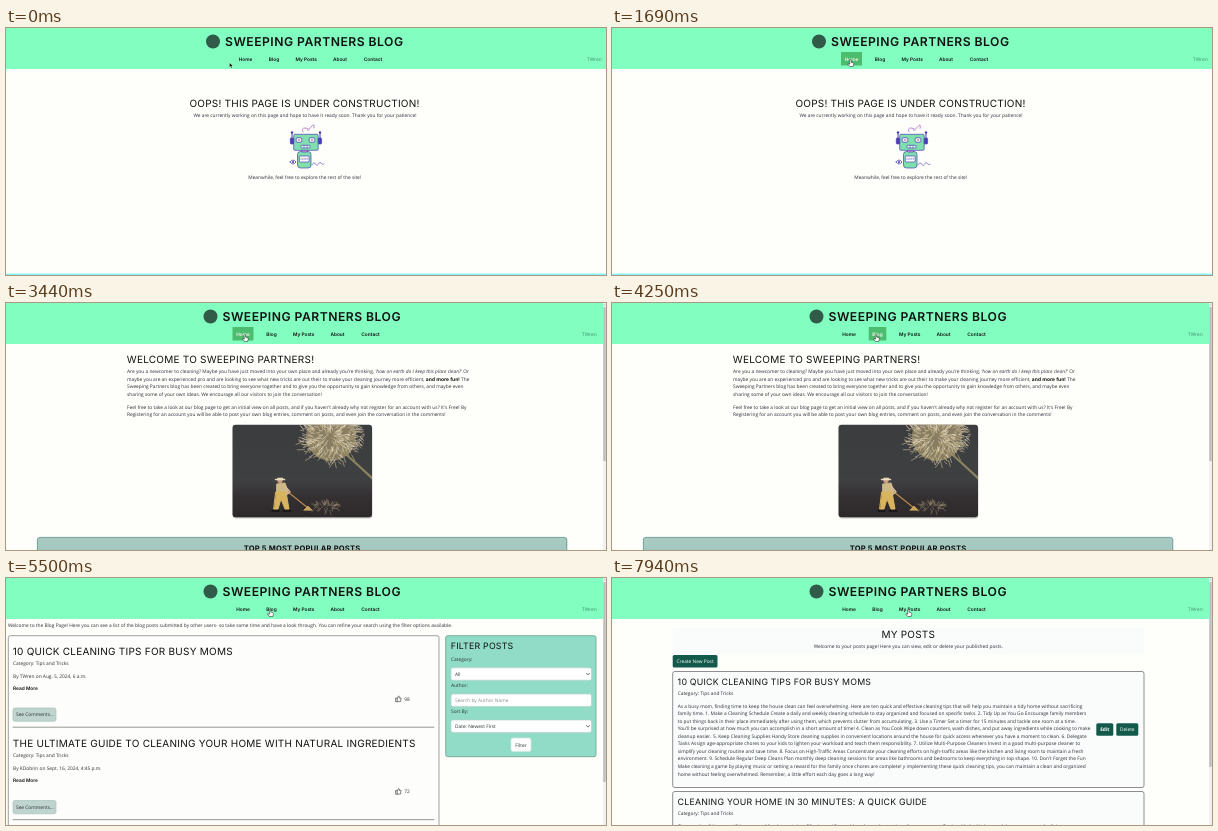
Write an HTML page that moves like this. It is 600 px wide and 247 px high and loops after 8000 ms.

```html
<!DOCTYPE html>
<html lang="en">
<head>
<meta charset="utf-8">
<title>Sweeping Partners Blog</title>
<style>
  html, body { margin: 0; width: 100%; height: 100%; overflow: hidden; background: #fefefb; }
  svg { display: block; width: 100vw; height: 100vh; }
  text { font: 4.84px "Open Sans", "Noto Sans", sans-serif; fill: #2b3034; text-rendering: geometricPrecision; }
  .h { font: 10px Inter, sans-serif; letter-spacing: .024em; fill: #111; }
  .h.small { font-size: 8.8px; }
  .h.panel { font-size: 7.6px; font-weight: 700; }
  .h.brand { font-size: 12.2px; font-weight: 600; letter-spacing: .47px; }
  .nav { font: 600 4.8px Inter, sans-serif; fill: #111; }
  .mid { text-anchor: middle; }
  .bold { font-weight: 700; fill: #111; }
  .hint { fill: #858a8c; }
  .user { fill: #3f8a66; }
  .tiny { font-size: 3px; fill: #4b3fb5; }
  .button { fill: #fff; }
</style>
</head>
<body>
<svg id="stage" viewBox="0 0 600 247" preserveAspectRatio="none"></svg>
<script>
const text = (x, y, s, cls = '') => `<text x="${x}" y="${y}" class="${cls}">${s}</text>`;
const box = (x, y, w, h, fill, stroke = 'none', r = 2, extra = '') =>
  `<rect x="${x}" y="${y}" width="${w}" height="${h}" rx="${r}" fill="${fill}" stroke="${stroke}" stroke-width=".7" ${extra}/>`;
const path = (d, stroke, width = .7, fill = 'none') =>
  `<path d="${d}" stroke="${stroke}" stroke-width="${width}" fill="${fill}" stroke-linecap="round" stroke-linejoin="round"/>`;
const disc = (x, y, r, fill, opacity = 1) => `<circle cx="${x}" cy="${y}" r="${r}" fill="${fill}" opacity="${opacity}"/>`;
const lines = (x, y, pitch, list) => list.map((s, i) => text(x, y + i * pitch, s)).join('');
const group = (id, content) => `<g id="${id}">${content}</g>`;

const links = [
  { name: 'Home', x: 239.5, half: 10.5 },
  { name: 'Blog', x: 268, half: 8.8 },
  { name: 'My Posts', x: 300.2, half: 14 },
  { name: 'About', x: 334, half: 10.6 },
  { name: 'Contact', x: 367, half: 12.7 }
];

const header = () => box(0, 0, 600, 41, '#82ffc0', 'none', 0) + group('bar',
  disc(207, 13.5, 7, '#2f5b48') +
  text(219, 17.5, 'SWEEPING PARTNERS BLOG', 'h brand') +
  box(0, 24, 20, 13.6, '#4cbc6e', 'none', .5, 'id="hover"') +
  links.map(l => text(l.x, 32.7, l.name, 'nav mid')).join('')) +
  group('user', text(581, 32.6, 'TWren', 'user'));

function robot() {
  const ink = '#4b3fb5', green = '#7fe0ae';
  const eye = (x, y) => box(x - 2.8, y - 2.3, 5.6, 4.6, '#e9fff4', ink, 1) +
    path(`M${x - 1.3} ${y - 1.2}l2.6 2.4m0 -2.4l-2.6 2.4`, '#d05aa8', .6);
  return box(291.5, 123.5, 13.5, 16.5, green, ink, 3) +
    box(293.3, 128, 9.8, 6, '#fff', ink, .8) + text(298.2, 132.1, 'OOPS', 'tiny mid') +
    path('M284 134q3 -4 6 0q-3 4 -6 0', ink, .8, '#fff') + disc(287, 134, 1, ink) +
    group('wire', path('M306 137q2 -4 3.5 -1t3 0t2.5 -1t3 1', ink, .6)) +
    group('head',
      box(295.5, 120, 6, 4, '#e69bcd', ink, .5) +
      box(287.7, 106.3, 24.5, 16, green, ink, 1.2) + eye(293, 112) + eye(306, 112) +
      box(295, 117.3, 9, 2.6, '#e9fff4', ink, .5) + path('M298 117.3v2.6M301 117.3v2.6', ink, .5) +
      box(284.3, 110, 3.4, 6, ink, ink, 1) + box(312.2, 110, 3.4, 6, ink, ink, 1) +
      path('M286 110v-5M314 110v-5', ink, 1) + disc(286, 104.5, 1.2, ink) + disc(314, 104.5, 1.2, ink)) +
    group('spring', path('M297 104q-2 -4 2 -4t3 2t3 -3t3 1', '#a65ac2', .7));
}

const construction = () =>
  text(298.5, 78.5, 'OOPS! THIS PAGE IS UNDER CONSTRUCTION!', 'h mid') +
  text(299, 88.8, 'We are currently working on this page and hope to have it ready soon. Thank you for your patience!', 'mid') +
  robot() +
  text(298.7, 151, 'Meanwhile, feel free to explore the rest of the site!', 'mid') +
  box(0, 245.6, 600, 1.4, '#7ff6fb', 'none', 0);

// Ragged tufts of a dandelion head: short strokes scattered around a centre.
function tufts(cx, cy, rx, ry, count, length) {
  let seed = 7, d = '';
  const random = () => (seed = seed * 16807 % 2147483647) / 2147483647;
  for (let i = 0; i < count; i++) {
    const a = random() * 2 * Math.PI, r = Math.sqrt(random()), turn = a + random() * 1.6 - .8;
    const size = length * (.5 + random());
    d += `M${(cx + rx * r * Math.cos(a)).toFixed(1)} ${(cy + ry * r * Math.sin(a)).toFixed(1)}` +
      `l${(size * Math.cos(turn)).toFixed(1)} ${(size * Math.sin(turn)).toFixed(1)}`;
  }
  return d;
}

const photo = () =>
  box(226.9, 122.6, 139.5, 93, '#c4c4c2', 'none', 3) +
  '<g clip-path="url(#frame)">' + box(226, 121, 141, 94, 'url(#dusk)', 'none', 0) +
  path('M336 148Q350 160 368 177', '#8b8460', 2.2) +
  disc(325, 133, 25, '#a3936c', .75) +
  path(tufts(325, 134, 31, 26, 260, 5), '#c9b98f', .6) +
  path(tufts(327, 132, 30, 25, 190, 4), '#eee6d2', .5) +
  path(tufts(319, 204, 13, 3.5, 45, 4), '#94856a', .5) +
  path('M277 185L302 205', '#b98a4c', 1.1) + path('M298 207l4 -4l4 4z', '#c9a45e', .8, '#c9a45e') +
  path('M271 181l8 -1l3 9l-3 3h-8z', '#cdb988', 1, '#cdb988') +
  path('M270 189h10l3 17h-4l-4 -10l-3 10h-4z', '#d9b45e', 1, '#d9b45e') +
  path('M279 183l5 6l-4 3', '#d8b79a', 1.5) + disc(274, 177.5, 2.6, '#c99f80') +
  path('M269.5 176.5h9M272 175.5h4.5', '#e6dcbd', 1.5) +
  path('M266 208h7m4 0h8', '#151214', 1.5) + '</g>';

const homeText = () =>
  text(120.8, 60, 'WELCOME TO SWEEPING PARTNERS!', 'h') +
  lines(121, 70.2, 7.5, [
    "Are you a newcomer to cleaning? Maybe you have just moved into your own place and already you're thinking, <tspan font-style='italic'>'how on earth do I keep this place clean?'</tspan> Or",
    'maybe you are an experienced pro and are looking to see what new tricks are out their to make your cleaning journey more efficient, <tspan class="bold">and more fun!</tspan> The',
    'Sweeping Partners blog has been created to bring everyone together and to give you the opportunity to gain knowledge from others, and maybe even',
    'sharing some of your own ideas. We encourage all our visitors to join the conversation!'
  ]) +
  lines(121, 105.6, 7.5, [
    "Feel free to take a look at our blog page to get an initial view on all posts, and if you haven't already why not register for an account with us? It's Free! By",
    'Registering for an account you will be able to post your own blog entries, comment on posts, and even join the conversation in the comments!'
  ]);

const homeMedia = () => photo() + box(31.4, 234.4, 529.4, 30, 'url(#panel)', '#48857a', 2.5) +
  text(296, 247.6, 'TOP 5 MOST POPULAR POSTS', 'h panel mid');

const entry = (y, title, by, likes) =>
  text(6.8, y + 19, title, 'h') +
  text(7, y + 29.2, 'Category: Tips and Tricks') + text(7, y + 42, by) +
  text(7, y + 54.2, 'Read More', 'nav') +
  path(`M390 ${y + 62.6}h1.2v3.6h-1.2zM391.2 ${y + 62.8}l1.4 -2.4q1.2 .2 .6 2h1.9l-.6 3.7h-3.3`, '#333', .6) +
  text(398.3, y + 65.2, likes) +
  box(7, y + 72.5, 43, 13.3, '#bfd4cf', '#a9c2bc') + text(10, y + 80.9, 'See Comments...') +
  path(`M7 ${y + 91.7}H428`, '#8c8c8c', .9);

const field = (y, label, value, cls, arrow) =>
  text(445, y - 7.3, label) + box(445, y, 140.5, 12.4, '#fff', '#bccfca', 1.8) +
  text(449, y + 8, value, cls) + (arrow ? path(`M580.5 ${y + 5.5}l1.5 1.6l1.5 -1.6`, '#333') : '');

const blog = () =>
  text(2, 49, 'Welcome to the Blog Page! Here you can see a list of the blog posts submitted by other users- so take some time and have a look through. You can refine your search using the filter options available.') +
  box(2.3, 57.7, 430.7, 200, '#fdfdfb', '#77797c') +
  entry(57.5, '10 QUICK CLEANING TIPS FOR BUSY MOMS', 'By TWren on Aug. 5, 2024, 6 a.m.', 98) +
  entry(150, 'THE ULTIMATE GUIDE TO CLEANING YOUR HOME WITH NATURAL INGREDIENTS', 'By KDobrin on Sept. 16, 2024, 4:45 p.m.', 72) +
  box(439.7, 57.7, 150.3, 121, '#90dcc6', '#5f9586') +
  text(444.8, 71, 'FILTER POSTS', 'h small') +
  field(89.8, 'Category:', 'All', '', true) +
  field(116, 'Author:', 'Search by Author Name', 'hint', false) +
  field(142, 'Sort By:', 'Date: Newest First', '', true) +
  box(505, 160, 20, 13.4, '#fff', '#d5e5e0') + text(515, 168.5, 'Filter', 'mid');

const opening = 'As a busy mom, finding time to keep the house clean can feel overwhelming. Here ar';
const article = [
  opening + 'e ten quick and effective cleaning tips that will help you maintain a tidy home without sacrificing',
  'family time. 1. Make a Cleaning Schedule Create a daily and weekly cleaning schedule to stay organized and focused on specific tasks. 2. Tidy Up as You Go Encourage family members',
  'to put things back in their place immediately after using them, which prevents clutter from accumulating. 3. Use a Timer Set a timer for 15 minutes and tackle one room at a time.',
  "You'll be surprised at how much you can accomplish in a short amount of time! 4. Clean as You Cook Wipe down counters, wash dishes, and put away ingredients while cooking to make",
  'cleanup easier. 5. Keep Cleaning Supplies Handy Store cleaning supplies in convenient locations around the house for quick access whenever you have a moment to clean. 6. Delegate',
  'Tasks Assign age-appropriate chores to your kids to lighten your workload and teach them responsibility. 7. Utilize Multi-Purpose Cleaners Invest in a good multi-purpose cleaner to',
  'simplify your cleaning routine and save time. 8. Focus on High-Traffic Areas Concentrate your cleaning efforts on high-traffic areas like the kitchen and living room to maintain a fresh',
  "environment. 9. Schedule Regular Deep Cleans Plan monthly deep cleaning sessions for areas like bathrooms and bedrooms to keep everything in top shape. 10. Don't Forget the Fun",
  'Make cleaning a game by playing music or setting a reward for the family once chores are complete! y implementing these quick cleaning tips, you can maintain a clean and organized',
  'home without feeling overwhelmed. Remember, a little effort each day goes a long way!'
];

function posts(full) {
  const left = full ? 60.7 : 61.3, right = full ? 532 : 536.2, centre = full ? 296.3 : 299;
  const card = (y, h, title, body) =>
    box(left, y, right - left, h, '#fafcfc', '#625d66') +
    text(left + 4.9, y + 13, title, 'h small') +
    text(left + 5, y + 23.6, 'Category: Tips and Tricks') + lines(left + 5, y + 36.1, 7.55, body);
  const button = (x, y, w, label, cls = '') =>
    box(x, y, w, 12.5, '#145a4c', 'none', 1.5) + text(x + w / 2, y + 7.9, label, 'mid button ' + cls);
  return box(left, 50, right - left, 26, '#fafcfc', 'none', 0) +
    text(centre, 60, 'MY POSTS', 'h mid') +
    text(centre, 70.2, 'Welcome to your posts page! Here you can view, edit or delete your published posts.', 'mid') +
    button(left, 77, 44.8, 'Create New Post') +
    card(93.5, full ? 116 : 48, '10 QUICK CLEANING TIPS FOR BUSY MOMS', full ? article : [opening]) +
    (full ? button(484.3, 145.3, 17, 'Edit', 'bold') + button(504.3, 145.3, 22, 'Delete') +
      card(213.5, 60, 'CLEANING YOUR HOME IN 30 MINUTES: A QUICK GUIDE', [
        'Short on time? You can still have a sparkling home in just 30 minutes! Start with a plan and set a timer for every room. Begin with the kitchen and then move on to the living room'
      ]) : '');
}

const stage = document.getElementById('stage');
stage.innerHTML = `<style>.button.bold { fill: #fff; }</style><defs>
  <linearGradient id="dusk" x2="0" y2="1"><stop stop-color="#3b3c3e"/><stop offset=".6" stop-color="#3f4042"/><stop offset=".78" stop-color="#343032"/><stop offset="1" stop-color="#2d292b"/></linearGradient>
  <linearGradient id="panel" x2="0" y2="1"><stop stop-color="#a9cbc3"/><stop offset="1" stop-color="#9cc3b9"/></linearGradient>
  <clipPath id="frame"><rect x="226.5" y="121.8" width="139.5" height="92.5" rx="3"/></clipPath></defs>` +
  box(0, 0, 600, 247, '#fefefb', 'none', 0) + header() +
  group('construction', construction()) + group('homeText', homeText()) + group('homeMedia', homeMedia()) +
  group('blog', blog()) + group('postsPart', posts(false)) + group('postsFull', posts(true)) +
  group('scroll', box(597, 0, 3, 247, '#f1f1f1', 'none', 0) + path('M597.8 2.2l.7 -.8l.7 .8', '#777', .4) +
    box(597.3, 4, 2.4, 150, '#bdbdbd', 'none', 0, 'id="thumb"')) +
  group('arrow', path('M0 0v4.6l1.1 -1l.8 1.7l.8 -.4l-.8 -1.6h1.5z', '#fff', .3, '#111')) +
  group('hand', path('M-.7 .6q.7 -1 1.4 0v2.3l2.3 .6q.6 .4 .4 1.6l-.6 2.2h-3.4l-2 -2.6q0 -.9 1.9 .1z', '#111', .5, '#fff'));

const el = id => document.getElementById(id);
const layers = ['construction', 'homeText', 'homeMedia', 'blog', 'postsPart', 'postsFull'];
const views = [
  { at: 0, show: ['construction'] },
  { at: 2250, show: ['homeText'] },
  { at: 2500, show: ['homeText', 'homeMedia'], thumb: 154 },
  { at: 5000, show: ['blog'], thumb: 200 },
  { at: 6620, show: ['postsPart'] },
  { at: 7440, show: ['postsFull'], thumb: 185 }
];
const moves = [
  { from: 150, to: 650, a: [223.5, 34.8], b: [238.3, 31.2] },
  { from: 3400, to: 3900, a: [238.3, 31.2], b: [264, 31.2] },
  { from: 5780, to: 6280, a: [264, 31.2], b: [296.3, 31.2] }
];

function draw(t) {
  const view = views.filter(v => v.at <= t).pop();
  const move = moves.filter(m => m.from <= t).pop() || moves[0];
  const p = Math.min(1, Math.max(0, (t - move.from) / (move.to - move.from)));
  const ease = p * p * (3 - 2 * p);
  const [x, y] = move.a.map((v, i) => v + (move.b[i] - v) * ease);
  const shift = view.thumb ? -2.5 : 0;

  layers.forEach(id => el(id).style.display = view.show.includes(id) ? '' : 'none');
  el('scroll').style.display = view.thumb ? '' : 'none';
  el('thumb').setAttribute('height', view.thumb || 0);
  el('bar').setAttribute('transform', `translate(${shift})`);
  el('user').setAttribute('transform', `translate(${shift * 2})`);
  el('homeText').setAttribute('transform', `translate(${view.thumb ? 0 : 2.5})`);

  // A freshly loaded page shows no hover until the pointer moves again.
  const over = links.find(l => Math.abs(x - l.x - shift) < l.half);
  const hovered = move.from >= view.at && t >= move.from ? over : null;
  el('hover').style.display = hovered ? '' : 'none';
  if (hovered) {
    el('hover').setAttribute('x', hovered.x - hovered.half);
    el('hover').setAttribute('width', hovered.half * 2);
  }
  document.querySelectorAll('#bar .nav').forEach((n, i) => n.style.fill = links[i] === hovered ? '#f2fbe9' : '');

  el('arrow').style.display = over ? 'none' : '';
  el('hand').style.display = over ? '' : 'none';
  el(over ? 'hand' : 'arrow').setAttribute('transform', `translate(${x} ${y})`);

  const sway = Math.sin(t / 260);
  el('head').setAttribute('transform', `translate(0 ${.5 - .5 * Math.cos(t / 260)})`);
  el('spring').setAttribute('transform', `rotate(${8 * sway} 299 104)`);
  el('wire').setAttribute('transform', `rotate(${6 * sway} 306 137)`);
}

function tick() {
  draw(performance.now() % 8000);
  requestAnimationFrame(tick);
}
tick();
</script>
</body>
</html>
```
